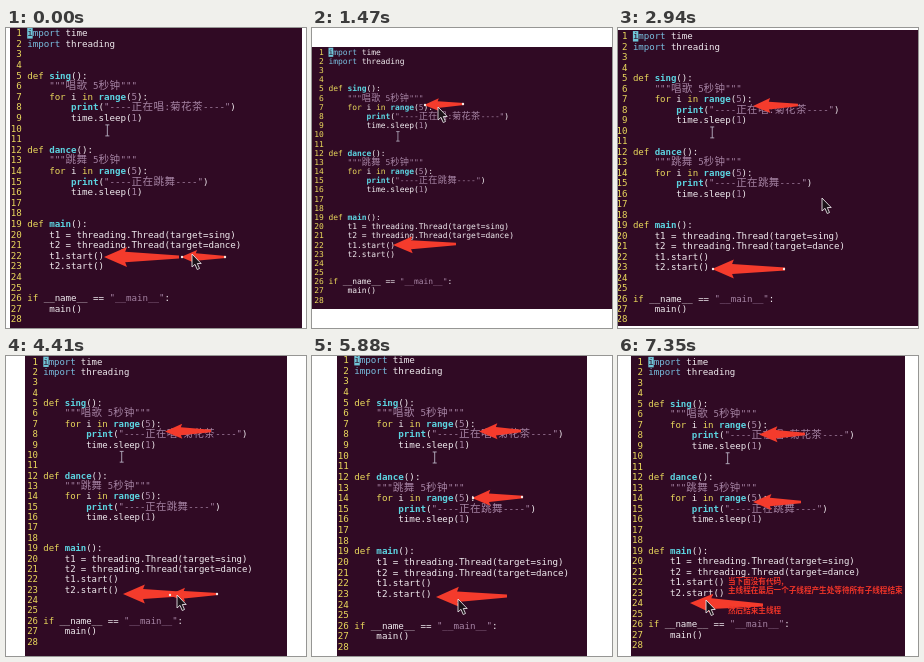
Recreate the animation shown at these times as an HTML page. Size 300 px wide and 300 px high, loop 8.82 s.

```html
<!DOCTYPE html>
<html lang="zh">
<head>
<meta charset="utf-8">
<title>Threads</title>
<style>
  html, body { margin: 0; width: 100%; height: 100%; overflow: hidden; background: #fff; }
  svg { display: block; width: 100vw; height: 100vh; }
  text { white-space: pre; }
  .code { font: 9.2px "DejaVu Sans Mono", "Noto Sans CJK SC", "Noto Sans CJK", monospace; fill: #f0ebef; }
  .code .han { font-size: 10.6px; }
  .code .num, .code .key { fill: #ead95c; }
  .code .imp { fill: #79bfe0; }
  .code .id { fill: #5cd3e0; font-weight: bold; }
  .code .str { fill: #a583a3; }
  .code .cursor { fill: #300a24; }
  .note { font: bold 7.6px "Noto Sans CJK SC", "Noto Sans CJK", sans-serif; fill: #ee3428; }
</style>
</head>
<body>
<svg id="stage" viewBox="0 0 300 300"></svg>
<script>
const HOLD = 1470, CELL = 5.49, ROW = 10.6;
const RED = '#f43b2c';
const stage = document.getElementById('stage');

const source = `import time
import threading


def sing():
    """唱歌 5秒钟"""
    for i in range(5):
        print("----正在唱:菊花茶----")
        time.sleep(1)


def dance():
    """跳舞 5秒钟"""
    for i in range(5):
        print("----正在跳舞----")
        time.sleep(1)


def main():
    t1 = threading.Thread(target=sing)
    t2 = threading.Thread(target=dance)
    t1.start()
    t2.start()


if __name__ == "__main__":
    main()
`.split('\n');

// x, y: left of column 0 and middle of line 1; s: zoom; inset: white margin at the sides and at top and bottom
// arrows: tip x, tip y, tail x, tail y, half height, handles shown
const scenes = [
  { x: 21.2, y: 5, s: 1, inset: [4, 0], mouse: [186, 226],
    arrows: [[98, 229, 173, 229, 10], [175, 229, 220, 229, 7, 1]] },
  { x: 16.5, y: 24, s: .866, inset: [0, 19], mouse: [126, 79],
    arrows: [[112, 77, 152, 76, 6.5, 1], [81, 217, 144, 216, 8.5]] },
  { x: 14.9, y: 8, s: .99, inset: [0, 2], mouse: [204, 170],
    arrows: [[135, 78, 180, 77, 7.5], [94, 241, 167, 241, 9.5, 1]] },
  { x: 37.3, y: 5.5, s: .978, inset: [19, 0], mouse: [171, 239],
    arrows: [[159, 75.5, 205, 75, 7.5], [117, 238, 188, 238, 9.5], [163, 239, 212, 238, 7, 1]] },
  { x: 42.3, y: 3.8, s: 1.003, inset: [25, 0], mouse: [146, 243],
    arrows: [[167, 75.5, 209, 75, 8], [160, 142, 211, 141, 8, 1], [124, 241, 195, 240, 10]] },
  { x: 30.3, y: 5.8, s: .99, inset: [13, 0], mouse: [88, 244],
    arrows: [[141, 78.5, 187, 78, 8], [135, 146, 183, 146, 8], [72, 247, 145, 249, 10]],
    notes: [[110, 228, '当下面没有代码,'], [110, 237, '主线程在最后一个子线程产生处等待所有子线程结束'],
            [110, 256.5, '然后结束主线程']] }
];

const isHan = c => c > '\u2e80';
const cells = s => [...s].reduce((n, c) => n + (isHan(c) ? 2 : 1), 0);

function run(s, col, row, cls) {
  let c = col;
  const xs = [...s].map(ch => {
    const x = c * CELL;
    c += isHan(ch) ? 2 : 1;
    return x.toFixed(1);
  });
  const y = (row * ROW + 3.2).toFixed(1);
  return `<text class="${cls}" x="${xs.join(' ')}" y="${y}">${s}</text>`;
}

function style(token, before) {
  if (/^["\d]/.test(token)) return 'str';
  if (token === 'import') return 'imp';
  if (/^(def|for|in|if)$/.test(token)) return 'key';
  if (/^(range|print)$/.test(token) || /def $/.test(before)) return 'id';
  return '';
}

function codeLine(line, row) {
  const label = String(row + 1);
  let out = run(label, -1 - label.length, row, 'num');
  for (const m of line.matchAll(/"+[^"]*"+|\w+|[^\s\w"]+/g)) {
    const before = line.slice(0, m.index);
    const cls = style(m[0], before);
    let col = cells(before);
    for (const part of m[0].match(/[\u2e80-\uffff]+|[^\u2e80-\uffff]+/g)) {
      out += run(part, col, row, cls + (isHan(part[0]) ? ' han' : ''));
      col += cells(part);
    }
  }
  return out;
}

function beam() {
  const x = 14.6 * CELL, y = 9 * ROW + 2;
  return `<path d="M${x - 2} ${y - 5.5}h4M${x} ${y - 5.5}v11M${x - 2} ${y + 5.5}h4" stroke="#b9b3c4" stroke-width=".9" fill="none"/>`;
}

const listing = source.map(codeLine).join('') +
  `<rect x="0" y="-5" width="${CELL}" height="${ROW}" fill="#6fc6d8"/>` +
  run('i', 0, 0, 'cursor') + beam();

function arrow([x, y, tx, ty, h, handles]) {
  const len = Math.hypot(tx - x, ty - y);
  const turn = Math.atan2(ty - y, tx - x) * 180 / Math.PI;
  const head = h * 2.3, neck = head * .92, w = h * .53, end = h * .16;
  const dot = cx => `<circle cx="${cx}" r="1.2" fill="#f3e6e4"/>`;
  return `<g transform="translate(${x} ${y}) rotate(${turn})">` +
    `<path fill="${RED}" d="M0 0L${head} ${-h}L${neck} ${-w}L${len} ${-end}V${end}L${neck} ${w}L${head} ${h}Z"/>` +
    (handles ? dot(1) + dot(len - 1) : '') + '</g>';
}

const mouse = ([x, y]) =>
  `<path transform="translate(${x} ${y})" d="M0 0V13L3 10.3L5.2 15.5L7.5 14.5L5.3 9.5H9.2Z" fill="#1b1218" stroke="#e6e0e5" stroke-width=".9" stroke-linejoin="round"/>`;

const note = ([x, y, s]) => `<text class="note" x="${x}" y="${y}">${s}</text>`;

function draw({ x, y, s, inset: [dx, dy], arrows, notes = [], mouse: pos }) {
  return `<rect x="${dx}" y="${dy}" width="${300 - 2 * dx}" height="${300 - 2 * dy}" fill="#300a24"/>` +
    `<g class="code" transform="translate(${x} ${y}) scale(${s})">${listing}</g>` +
    arrows.map(arrow).join('') + notes.map(note).join('') + mouse(pos);
}

stage.innerHTML = scenes.map(sc => `<g display="none">${draw(sc)}</g>`).join('');
const layers = [...stage.children];
let shown = -1;

function update(t) {
  const i = Math.floor(t / HOLD) % scenes.length;
  if (i === shown) return;
  layers.forEach((g, k) => g.setAttribute('display', k === i ? 'inline' : 'none'));
  shown = i;
}

const start = performance.now();
function tick() {
  update(performance.now() - start);
  requestAnimationFrame(tick);
}
tick();
</script>
</body>
</html>
```
